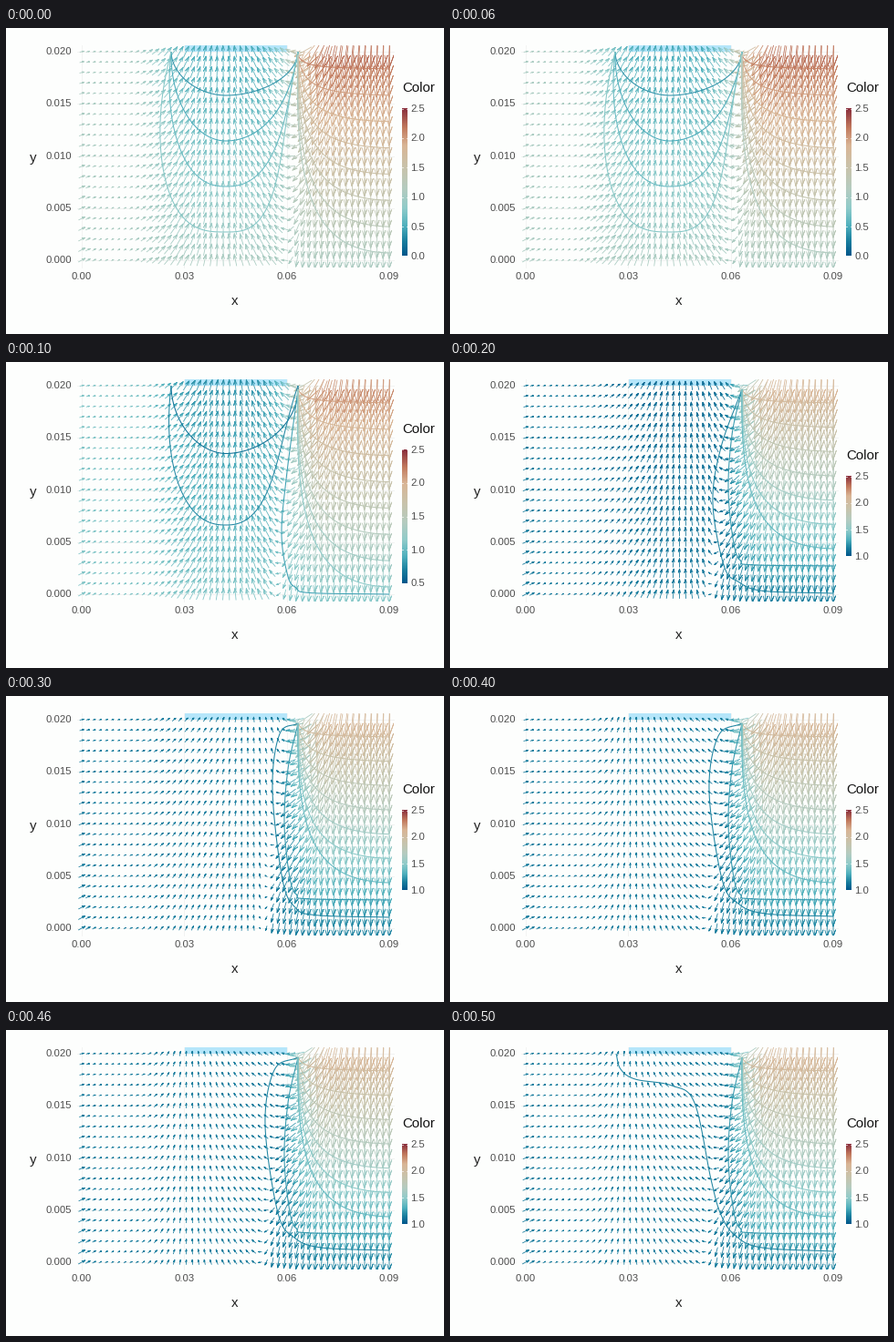
A matplotlib script that plays this animation: 480 by 336 pixels, repeating every 600 ms.

```python
import numpy as np
import matplotlib.pyplot as plt
from matplotlib.animation import FuncAnimation
from matplotlib.collections import LineCollection
from matplotlib.colors import LinearSegmentedColormap
from matplotlib.patches import Rectangle

W, H, DPI = 480, 336, 100
PX = 72 / DPI
LEFT, RIGHT, TOP, BOTTOM = 83, 420, 26, 255
CORNER = (320, 30)
GREY, GRID = "#4d4d4d", "#f2f3f2"

plt.rcParams["font.family"] = "Liberation Sans"
cmap = LinearSegmentedColormap.from_list("heat", [
    (0, "#00588b"), (.1, "#1a809f"), (.2, "#4fb0bd"), (.32, "#8fcbca"),
    (.45, "#b4ccc0"), (.6, "#c9c3ab"), (.75, "#d9b595"),
    (.87, "#c27a5e"), (1, "#8a2f3c")])


def smooth(x, a, b):
    t = np.clip((x - a) / (b - a), 0, 1)
    return t * t * (3 - 2 * t)


def height(y):
    return 1 - (y - TOP) / (BOTTOM - TOP)


def cooling(step):
    """Strength of the cold patch, fading out over the first steps."""
    return max(0, 1 - .45 * step)


def lowest(step):
    return min(.5 * step, 1)


def temperature(step, x, y):
    """Temperature as a fraction of the colour scale."""
    cold, high = cooling(step), height(y)
    base = 1.14 - .09 * cold
    dip = smooth(x, 130, 215) * (1 - smooth(x, 275, 325))
    middle = base - .57 * cold * dip * high ** .8
    hot = base + .02 + (2.07 + .13 * cold - base) * high
    w = smooth(x, 300, 350)
    return (middle * (1 - w) + hot * w - lowest(step)) / (2.5 - lowest(step))


def field(step, x, y):
    """Heat flow as arrow vectors in pixels (y down)."""
    high = height(y)
    onset = 130 + 22 * step if step < 4 else 147
    centre = onset + 105 - 13 * step
    inside = smooth(x, onset, onset + 58)

    rest = 2.6 + (6 - 4 * high) * np.exp(-(x - LEFT) / 10)
    rest = rest + 2.5 * smooth(x, 125, 185)
    tilt = np.radians(12 + 16 * (1 - high) + 38 * smooth(x, 130, 210))
    pull = 5.5 + 7.5 * (1 - smooth(step, 1, 3.2))
    turn = .7 * np.clip((centre - x) / 58, -1.3, 1.3)
    u = rest * (1 - inside) * np.cos(tilt) + pull * inside * np.sin(turn)
    v = -rest * (1 - inside) * np.sin(tilt) - pull * inside * np.cos(turn)

    e = np.clip(x - CORNER[0], 0, None)
    lean = np.radians(58 * high * np.exp(-e / 16)
                      + 18 * (.5 + .5 * high) * np.exp(-e / 42))
    size = 12 + 7 * smooth(x, 295, 345) + 20 * high ** 3 * smooth(x, 312, 345)
    edge_low = 284 + 25 * cooling(step)
    edge = edge_low + (319 - 2 * step - edge_low) * high
    w = smooth(x, edge - 15, edge + 13)
    return (u * (1 - w) - size * np.sin(lean) * w,
            v * (1 - w) + size * np.cos(lean) * w)


def arrows(step):
    x, y = map(np.ravel, np.meshgrid(np.linspace(LEFT, RIGHT, 51),
                                     np.linspace(TOP, BOTTOM, 21)))
    u, v = field(step, x, y)
    tail, tip = (np.stack([x + k * u, y + k * v], 1) for k in (-.5, .5))
    c, d = .42 * np.cos(np.radians(18)), .42 * np.sin(np.radians(18))
    barbs = [tip - np.stack([c * u - s * d * v, c * v + s * d * u], 1)
             for s in (1, -1)]
    return (np.stack([tail, tip, barbs[0], tip, barbs[1]], 1),
            cmap(temperature(step, x, y)))


def cup(x0, x1, depth, n):
    """U-shaped level line hanging from both ends of the cold patch."""
    t = np.linspace(0, np.pi, 90)
    co, drop = np.cos(t), np.sin(t) ** (2 / n)
    side = np.sign(co) * np.abs(co) ** (2 / n)
    x = 241 - np.where(co > 0, 241 - x0, x1 - 241) * side
    x = x + np.where(co > 0, 181 - x0, CORNER[0] - x1) * (1 - drop) ** 3
    return np.stack([x, TOP + (depth - TOP) * drop], 1)


def spline(*points):
    p = np.array(points, float)
    p = np.vstack([2 * p[0] - p[1], p, 2 * p[-1] - p[-2]])
    t = np.linspace(0, 1, 14)[:, None]
    return np.vstack([
        .5 * (2 * b + (c - a) * t + (2 * a - 5 * b + 4 * c - d) * t ** 2
              + (3 * b - a - 3 * c + d) * t ** 3)
        for a, b, c, d in zip(p, p[1:], p[2:], p[3:])])


def hook(x, y, y_end):
    """Level line from the hot corner, bulging to (x, y), out to the right."""
    w = (CORNER[0] - x) / 36
    return spline(CORNER, (x + 10 * w, y - 61), (x, y),
                  (x + 14 * w, y + .7 * (y_end - y)), (x + 32 * w, y_end - 14 * w),
                  (x + 62 * w, y_end - 3 * w), (RIGHT, y_end))


def sweep(y_end):
    """Level line fanning from the hot corner to the right edge."""
    f = 1 - height(y_end)
    t = np.linspace(0, 1, 50)[:, None]
    p = np.array([CORNER, (328 - 14 * f, .75 * y_end + 10),
                  (345, y_end - 2), (RIGHT, y_end)])
    return ((1 - t) ** 3 * p[0] + 3 * t * (1 - t) ** 2 * p[1]
            + 3 * t ** 2 * (1 - t) * p[2] + t ** 3 * p[3])


def contours(step):
    """Pairs of level line and colour fraction."""
    if step == 0:
        lines = [(cup(181 - .65 * k ** 3, 320 - 5 * k, 74 + 50 * k, 1.9 + .12 * k * k),
                  .14 + .055 * k) for k in range(4)]
    elif step == 1:
        lines = [(cup(181 - 6 * k, 322 - 20 * k, 100.5 + 78.5 * k, 1.9 + .5 * k),
                  .07 + .05 * k) for k in range(2)]
        lines.append((hook(302, 190, 255), .17))
    else:
        outer = {2: hook(288, 155, 254), 3: hook(292, 103, 243), 4: hook(284, 105, 242),
                 5: spline((182, 26), (187, 43), (203, 54), (243, 61), (268, 80),
                           (286, 164), (297, 203), (313, 226), (342, 239), (420, 243))}
        lines = [(outer[step], .11), (hook(305, 140, 224), .15)]
    last = 247 if step < 2 else 205
    for end in np.linspace(45, last, 8 if step < 2 else 7):
        lines.append((sweep(end), temperature(step, RIGHT, end)))
    return lines


fig = plt.figure(figsize=(W / DPI, H / DPI), dpi=DPI, facecolor="#fdfefd")
ax = fig.add_axes([0, 0, 1, 1])


def text(x, y, label, size=11.2, ha="center", color=GREY):
    ax.text(x, y, label, fontsize=size * PX, ha=ha, va="center_baseline", color=color)


def draw_axes():
    for k in range(5):
        y = BOTTOM - k * (BOTTOM - TOP) / 4
        ax.plot([78, 425], [y, y], color=GRID, lw=PX, zorder=0)
        text(72, y - 1, f"{k * .005:.3f}", ha="right")
    for k in range(4):
        x = LEFT + k * (RIGHT - LEFT) / 3
        ax.plot([x, x], [19, 263], color=GRID, lw=PX, zorder=0)
        text(x, 271.5, f"{k * .03:.2f}")
    text(251, 298, "x", 15, color="#222222")
    text(29.5, 141, "y", 15, color="#222222")
    ax.add_patch(Rectangle((196, 19), 111.5, 6.5, color="#b5e6fa", lw=0, zorder=1))


def draw_legend(step):
    k = min(step, 2)
    half = 81 + 3.5 * k - 11 * k * k
    top, bottom = 169.5 - half, 169.5 + half
    text(434.5, top - 24, "Color", 15, "left", "#111111")
    ax.imshow(np.linspace(1, 0, 200)[:, None], cmap=cmap, aspect="auto",
              extent=(434, 439.5, bottom, top), interpolation="bilinear")
    for value in np.arange(lowest(step), 2.6, .5):
        y = bottom - (value - lowest(step)) / (2.5 - lowest(step)) * 2 * half
        for x in (434, 438.5):
            ax.plot([x, x + 1], [y, y], color="white", lw=.7 * PX, zorder=5)
        text(443.5, y - .5, f"{value:.1f}", ha="left")


def draw(step):
    ax.clear()
    ax.axis("off")
    draw_axes()
    draw_legend(step)
    lines, levels = zip(*contours(step))
    panel = Rectangle((78, 19), 347, 244, transform=ax.transData)
    for paths, colors, width, z in ((*arrows(step), .8, 2),
                                    (lines, cmap(np.array(levels)), 1.05, 3)):
        group = LineCollection(paths, colors=colors, linewidths=width * PX, zorder=z,
                               capstyle="butt", joinstyle="round")
        ax.add_collection(group)
        group.set_clip_path(panel)
    ax.set(xlim=(0, W), ylim=(H, 0))
    return []


anim = FuncAnimation(fig, draw, frames=6, interval=100, repeat=True,
                     init_func=lambda: [])
plt.show()
```
